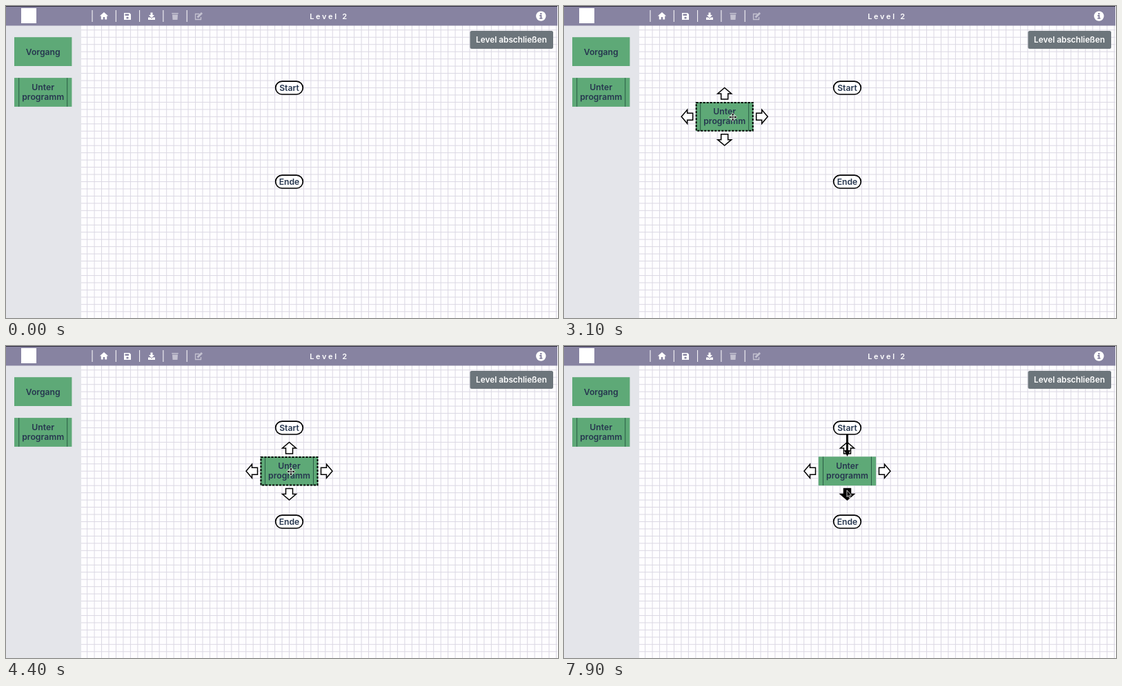
An HTML page that plays this animation: 800 by 452 pixels, repeating every 8000 ms.

```html
<!DOCTYPE html>
<html lang="de">
<head>
<meta charset="utf-8">
<title>Level 2</title>
<style>
html, body { margin: 0; width: 100%; height: 100%; overflow: hidden; }
svg { display: block; width: 100vw; height: 100vh; }
text { font: 600 12.2px Inter, "Open Sans", sans-serif; fill: #26364f; text-anchor: middle; }
.light { fill: #fff; }
.pill { fill: #fff; stroke: #000; stroke-width: 1.7; }
.arrows use { fill: #fff; stroke: #000; stroke-width: 1.5; }
.arrows use.on { fill: #000; }
.icon { fill: #fff; fill-rule: evenodd; }
.dim { opacity: .5; }
</style>
</head>
<body>
<svg viewBox="0 0 800 452">
  <defs>
    <path id="arrow" d="M-8-5H0V-10L8.5 0L0 10V5H-8Z"/>
    <g id="sub">
      <rect x="-41.7" y="-20.9" width="83.4" height="41.8" fill="#5ea977"/>
      <path d="M-35-20.8V20.8M35-20.8V20.8" stroke="#2b5c45"/>
      <text y="-3.2">Unter</text>
      <text y="11">programm</text>
    </g>
    <g id="pill">
      <rect class="pill" x="-19.8" y="-9.3" width="39.6" height="18.8" rx="9.4"/>
    </g>
  </defs>

  <rect width="800" height="452" fill="#fefdff"/>
  <path id="grid" stroke="#dbd8e3"/>
  <rect y="28" width="109" height="424" fill="#e4e5ea"/>
  <rect width="799" height="28.5" fill="#8783a1"/>
  <rect width="799" height="1" fill="#2f2c3c"/>
  <rect class="light" x="22" y="3" width="22" height="22"/>
  <path id="bars" stroke="#fff"/>

  <path class="icon" transform="translate(142 14.6)" d="M0-5.5L6.2 0H4.2V5H1.2V1.5H-1.2V5H-4.2V0H-6.2Z"/>
  <path class="icon" transform="translate(176 15)" d="M-5-5H3L5-3V5H-5ZM-3.5-3.6V-1H2V-3.6ZM-1.5 .8V3.6H1.5V.8Z"/>
  <path class="icon" transform="translate(211 15)" d="M-1.5-5.5H1.5V-2H4L0 2.5L-4-2H-1.5ZM-5 1.5H-2L0 3.5L2 1.5H5V5H-5Z"/>
  <path class="icon dim" transform="translate(245 15)" d="M-4.7-5H4.7V-3.4H-4.7ZM-4-2.6H4L3.5 5H-3.5Z"/>
  <g class="dim" stroke="#fff" fill="none" transform="translate(279 15)">
    <path d="M1-3.5H-4.5V4.5H3.5V1" stroke-width="1.3"/>
    <path d="M-1.5 1.5L5-5" stroke-width="2.8"/>
  </g>
  <circle class="light" cx="775.3" cy="14.6" r="7.2"/>
  <path d="M774 11.3H776.6M773.3 14H775.5V18M773.3 17.9H777.4" fill="none" stroke="#8783a1" stroke-width="1.9"/>
  <text class="light" x="468.5" y="18.6" style="font-size:11px;letter-spacing:2.7px">Level 2</text>

  <rect x="672.5" y="36" width="120.5" height="26" rx="2.5" fill="#6c757b"/>
  <text class="light" x="732.5" y="53" style="font-size:11.8px">Level abschließen</text>

  <rect x="12" y="45.2" width="83.4" height="41.8" fill="#5ea977"/>
  <text x="53.7" y="70.8">Vorgang</text>
  <use href="#sub" x="53.7" y="125"/>

  <g id="startArrows" class="arrows" transform="translate(410.5 118.5)"></g>
  <use href="#pill" x="410.5" y="118.5"/>
  <text x="410.5" y="122.8">Start</text>
  <use href="#pill" x="410.5" y="254.5"/>
  <text x="410.5" y="258.8">Ende</text>

  <g id="block">
    <g id="blockArrows" class="arrows"></g>
    <use href="#sub"/>
    <rect id="frame" x="-41" y="-20.3" width="82" height="40.6" fill="none" stroke="#000" stroke-width="2" stroke-dasharray="3 2"/>
  </g>
  <g id="link">
    <path id="edge" stroke="#000" stroke-width="3"/>
    <path id="head" d="M-4.5-8H4.5L0 1Z"/>
  </g>

  <g id="cursor" stroke="#fff" stroke-width=".8">
    <path id="pointer" d="M0 0V9.6L2.1 7.7L3.7 11.2L5.3 10.5L3.8 7.1H6.6Z"/>
    <g id="mover"></g>
  </g>
</svg>
<script>
const $ = id => document.getElementById(id);
const show = (el, on) => el.setAttribute('visibility', on ? 'visible' : 'hidden');
const place = (el, [x, y]) => el.setAttribute('transform', `translate(${x} ${y})`);
const range = n => [...Array(n).keys()];

const CELL = 10.46, START = [410.5, 118.5], GRAB = [2.5, 0];
const snap = (v, i) => START[i] + Math.floor((v - GRAB[i] - START[i]) / CELL) * CELL;

// Cursor moves: begin, end, x, y
const ENTRY = [236, 446];
const moves = [
  [1000, 1700, 161, 174],  // enter
  [1900, 2400, 49, 142],   // to the palette
  [2500, 3500, 351, 171.3],// drag
  [3500, 4200, 413, 182],  // drop
  [4500, 5000, 482, 206],  // deselect
  [5200, 6000, 411, 121],  // hover start
  [6200, 6500, 413, 138],  // lower arrow
  [6600, 7100, 412, 176],  // pull the link
  [7300, 7700, 410, 209]   // next arrow
];

function cursorAt(t) {
  let [x, y] = ENTRY;
  for (const [from, to, tx, ty] of moves) {
    const k = Math.min(1, Math.max(0, (t - from) / (to - from)));
    const e = k * k * (3 - 2 * k);
    x += (tx - x) * e;
    y += (ty - y) * e;
  }
  return [x, y];
}

// Four arrows around a shape of half size w by h; returns the lower one
function addArrows(g, w, h) {
  g.innerHTML = range(4).map(i =>
    `<use href="#arrow" transform="rotate(${i * 90}) translate(${(i % 2 ? h : w) + 12.5})"/>`).join('');
  return g.children[1];
}

const lines = range(80).map(i => i - 30);
$('grid').setAttribute('d', lines.map(i =>
  `M${START[0] + i * CELL} 28V452M109 ${START[1] + i * CELL}H799`).join(''));
$('bars').setAttribute('d', range(5).map(i => `M${125 + i * 34.3} 6V23`).join(''));
$('mover').innerHTML = range(4).map(i =>
  `<path transform="rotate(${i * 90})" d="M-1 0V-3.2H-2.5L0-6L2.5-3.2H1V0"/>`).join('');
const startDown = addArrows($('startArrows'), 20.5, 9.7);
const blockDown = addArrows($('blockArrows'), 41.5, 20.8);

const inside = ([x, y], [cx, cy], w, h) => Math.abs(x - cx) < w && Math.abs(y - cy) < h;

function draw(t) {
  const cur = cursorAt(t), block = cursorAt(Math.min(t, 4200)).map(snap);
  const placed = t >= 2600, selected = t >= 2800 && t < 5000;

  show($('block'), placed);
  place($('block'), block);
  show($('frame'), selected);
  show($('blockArrows'), selected || t >= 7300);
  blockDown.classList.toggle('on', t >= 7700);

  show($('startArrows'), t >= 5700 && t < 7200);
  startDown.classList.toggle('on', t >= 6400);

  const end = Math.min(cur[1], 159);
  show($('link'), t >= 6600);
  $('edge').setAttribute('d', `M410.5 128V${end - 4}`);
  place($('head'), [410.5, end]);

  const moving = placed && inside(cur, block, 41, 20) || t > 5000 && inside(cur, START, 20, 9);
  place($('cursor'), cur);
  show($('pointer'), t >= 1000 && !moving);
  show($('mover'), moving);
}

function tick() {
  draw(Math.floor(performance.now() % 8000 / 100) * 100);
  requestAnimationFrame(tick);
}
tick();
</script>
</body>
</html>
```
